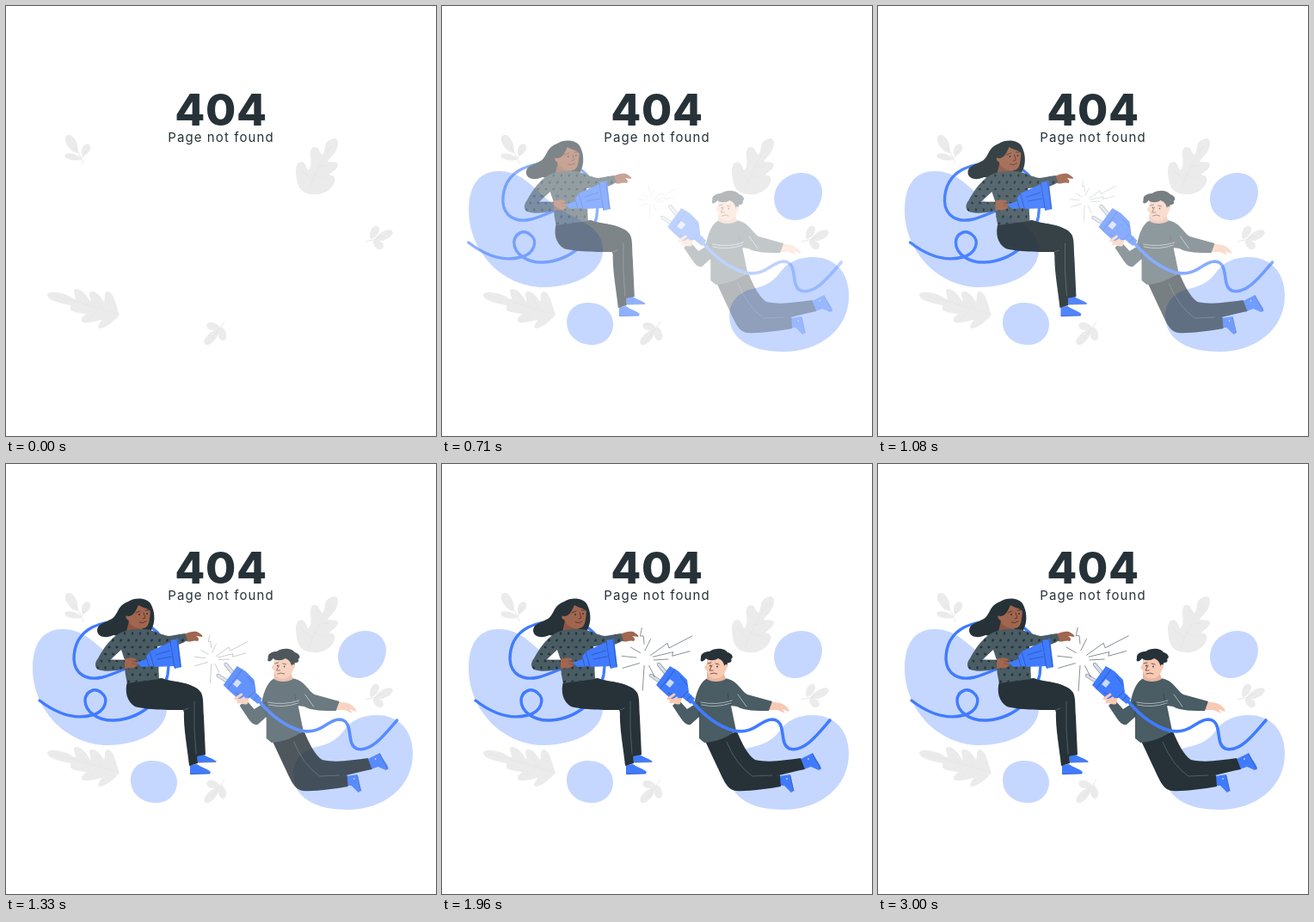
Write an HTML page with a canvas that moves like this. It is 500 by 500 pixels and loops after 3.04 s.

```html
<!DOCTYPE html>
<html lang="en">
<head>
<meta charset="utf-8">
<title>Page not found</title>
<style>
html, body { margin: 0; width: 100%; height: 100%; overflow: hidden; background: #fff; }
canvas { position: absolute; left: 0; top: 0; width: 500px; height: 500px; }
.t { position: absolute; left: 0; width: 500px; text-align: center; color: #263238; white-space: nowrap; font-family: Inter, "Open Sans", sans-serif; }
h1 { margin: 0; top: 90px; font-size: 51px; line-height: 62px; font-weight: 800; letter-spacing: .6px; }
p { margin: 0; top: 143px; font-size: 15px; line-height: 20px; font-weight: 400; letter-spacing: 1.1px; }
</style>
</head>
<body>
<canvas id="stage"></canvas>
<h1 class="t">404</h1>
<p class="t">Page not found</p>
<script>
const LOOP = 3040, FPS = 24, SIZE = 500;
const BLUE = '#407bff', PALE = '#c5d7ff', NAVY = '#2a52a8', INK = '#263238', KNIT = '#4a5c64';
const LEAF = '#ebebeb', VEIN = '#f7f7f7', BROWN = '#a0664f', PEACH = '#f8c9b3';
const dpr = window.devicePixelRatio || 1;
const stage = document.getElementById('stage');
const layer = document.createElement('canvas');
stage.width = stage.height = layer.width = layer.height = SIZE * dpr;
const out = stage.getContext('2d'), buf = layer.getContext('2d');
let g = out;

function fill(d, color) {
  g.fillStyle = color;
  g.fill(new Path2D(d));
}
function line(d, color, w = 1) {
  g.strokeStyle = color;
  g.lineWidth = w;
  g.lineCap = g.lineJoin = 'round';
  g.stroke(new Path2D(d));
}
function oval(x, y, rx, ry, deg, color) {
  g.fillStyle = color;
  g.beginPath();
  g.ellipse(x, y, rx, ry, deg * Math.PI / 180, 0, 7);
  g.fill();
}
// pointed leaf from base (x, y) towards deg
function blade(x, y, len, w, deg) {
  g.save();
  g.translate(x, y);
  g.rotate(deg * Math.PI / 180);
  fill(`M0 0C${len * .25} ${-w} ${len} ${-w} ${len} 0C${len} ${w} ${len * .25} ${w} 0 0Z`, LEAF);
  g.restore();
}

function leaves() {
  blade(83, 171, 24, 7.5, -120);
  blade(89, 174, 15, 6, -62);
  blade(88, 178, 20, 5, -167);
  line('M80 164Q86 172 90 183M88 177L93 168', '#dedede', .7);

  fill('M381 154C386 153 387 159 385 165C383 172 376 177 374 181C378 182 386 180 386 185C385 191 377 193 376 197C380 196 384 199 382 205C378 215 367 220 358 219C347 219 341 214 339 206C337 197 335 185 341 182C347 179 349 187 351 191C355 189 355 182 354 176C353 169 355 163 360 164C365 165 364 171 368 173C371 170 370 165 372 160C374 156 378 155 381 154Z', LEAF);
  line('M378 163Q363 184 352 214M362 187L375 185M358 196L371 201M356 202L344 192', '#e5e5e5', .6);

  blade(428, 273, 24, 6.5, -27);
  blade(424, 271, 17, 6, -62);
  blade(427, 273, 14, 6, 38);
  line('M418 274Q428 273 438 267', '#dedede', .7);

  fill('M48 335C51 331 61 333 68 335C74 337 78 341 81 341C82 338 76 330 81 329C88 328 95 338 98 344C100 342 94 334 99 332C106 331 111 340 114 344C116 341 113 333 118 332C126 333 128 349 132 359C126 366 118 373 110 375C105 375 107 370 112 365C105 366 97 369 91 368C85 367 88 361 94 358C87 357 80 357 76 354C73 351 77 349 75 348C66 346 47 343 48 335Z', LEAF);
  line('M55 337Q90 346 129 358M95 347L87 336M112 352L105 339M108 353L98 363', '#e5e5e5', .6);

  blade(248, 376, 24, 6.5, 134);
  blade(249, 375, 16, 6, -165);
  blade(250, 373, 16, 6, 80);
  line('M254 367Q248 376 239 387', '#dedede', .7);
}

function blobs() {
  fill('M31 238C31 211 41 192 66 192C92 192 106 211 128 230C151 248 187 253 187 284C187 311 153 327 118 327C70 327 31 285 31 238Z', PALE);
  fill('M145 366C146 352 157 345 170 345C187 345 199 356 199 371C198 386 187 394 174 394C157 394 144 382 145 366Z', PALE);
  fill('M386 223C387 206 401 195 417 194C433 194 442 204 442 217C441 235 428 248 411 249C396 249 386 239 386 223Z', PALE);
  fill('M334 360C334 345 344 334 357 330C374 326 384 322 392 311C401 298 414 292 431 292C458 292 473 311 473 337C473 375 440 402 397 402C360 402 334 388 334 360Z', PALE);
}

const knit = 'M136 195C147 191 161 192 168 193C177 196 184 200 190 200L208 197L211 205C203 210 195 212 188 211L176 212L178 250L141 255C139 248 139 243 138 238C127 241 115 242 107 239C103 236 103 231 107 226C114 213 124 199 136 195ZM134 216L121 228L138 228Z';

function woman() {
  line('M39 275C56 288 78 298 100 292C116 288 120 273 111 266C103 259 92 265 92 275C92 288 107 299 126 298C158 296 182 274 188 245C192 219 183 196 165 188C145 180 118 181 100 190C83 199 79 214 79 227C80 245 94 252 112 248C128 244 140 236 158 231', BLUE, 3.4);

  fill('M142 160C151 154 166 156 169 164C174 174 174 188 166 197C158 204 151 195 146 198C137 204 131 200 125 199C119 202 107 203 106 194C106 185 115 185 121 181C131 177 128 165 142 160Z', INK);

  // far leg and shoes
  fill('M222 338L230 338C234 341 240 342 245 346L223 347Z', BLUE);
  fill('M214 350L222 349C227 353 234 354 238 358L237 360L214 361Z', BLUE);
  line('M224 347L244 346.5M215 360.5L237 360', NAVY, .7);
  fill('M188 252C205 254 222 257 227 266C230 272 229 282 230 294L232 338L221 340L205 282Z', INK);
  fill('M141 253L181 249C194 254 216 253 221 263C224 270 220 280 219 292L223 348L213 351C211 330 206 307 207 286C190 286 163 286 150 282C140 276 138 264 141 253Z', INK);
  line('M207 286L212 284M219 276Q218 307 221 337', '#617078', .7);

  fill('M207 198C212 196 217 194 222 195C226 197 230 200 228 201L221 200C224 202 225 204 223 206C218 204 214 208 210 206Z', BROWN);
  fill('M144 178L160 188L158 194C153 200 144 199 140 195Z', '#8d5643');

  fill(knit, KNIT);
  g.save();
  g.clip(new Path2D(knit));
  for (let row = 0; row < 8; row++)
    for (let col = 0; col < 13; col++)
      oval(102 + col * 9 + row % 2 * 4.5, 197 + row * 8, 1.25, 1.7, row * 35, INK);
  g.restore();
  line('M138 238Q144 231 141 218M137 228L121 228', '#344349', .7);

  fill('M144 168C146 163 157 160 164 163C169 166 168 174 167 180C166 187 164 191 159 191C150 192 144 187 142 181C139 181 138 175 142 174Z', BROWN);
  fill('M142 177C148 177 151 171 154 164C158 167 164 167 168 171C169 164 164 157 154 157C144 157 139 166 138 176Z', INK);
  line('M151 173L156 171M162 170L166 170M160 173L162 179L159 180M155 184Q159 186 163 183', '#512f27', .8);
  oval(155, 175, .9, 1.1, 0, INK);
  oval(164, 174, .9, 1.1, 0, INK);

  // socket
  fill('M151 231L163 227L163 223L168 220L172 235L158 236Z', BLUE);
  fill('M164 223L167 218L191 207L197 235L172 236L167 233Z', BLUE);
  fill('M191 205L200 203L204 236L196 238Z', BLUE);
  line('M191 206L196 237M199 204L203 236M167 218L172 236M163 224L166 235M174 222L190 217M176 227L192 224', NAVY, .75);

  fill('M138 227C143 225 151 225 152 228L148 229C153 230 154 232 152 235C149 238 143 237 138 238Z', BROWN);
  line('M147 229L152 230M147 232L152 233', '#79473a', .6);
}

function man() {
  // shoes and legs
  fill('M392 363L405 361L409 380L406 382L398 374L393 374Z', BLUE);
  fill('M417 343L431 336C434 343 440 349 441 354L438 356L429 352L421 355Z', BLUE);
  line('M405 363L409 380M431 337L440 355', NAVY, .7);
  oval(426, 343, .8, .8, 0, '#fff');
  oval(401, 366, .8, .8, 0, '#fff');
  fill('M318 320L343 311C349 325 355 338 364 344C381 348 400 344 417 342L422 355C402 359 383 365 366 366C352 365 333 350 318 320Z', INK);
  fill('M306 322L331 316C337 333 347 352 360 363L393 362L394 375C377 378 354 381 342 380C331 379 327 366 320 352Z', INK);
  line('M331 323Q342 350 361 363L384 362', '#627077', .7);

  // far hand and sleeves
  fill('M381 277C388 277 395 277 399 281C402 283 405 287 403 288L396 285L399 290L390 286L380 286Z', PEACH);
  fill('M307 250C316 247 325 248 333 250C344 253 348 264 355 268L384 276L380 287C366 287 352 287 343 282L336 281L342 310C332 318 319 323 305 324L299 319L299 294L289 303C284 304 281 300 278 296L268 281L275 274L285 285L293 280C295 270 298 256 307 250Z', KNIT);
  line('M293 280L299 277L299 294M336 281Q332 274 332 267', '#344349', .8);
  line('M301 277Q319 281 337 275M302 280Q319 284 336 278M344 268L354 282', '#dce2e4', .65);

  // head
  fill('M308 242L325 236L330 250C324 254 313 254 308 250Z', '#e9b59f');
  fill('M308 225C315 221 327 222 330 229C333 235 330 244 324 248C316 252 309 248 308 240L305 237L308 232Z', PEACH);
  fill('M301 226C300 219 308 218 311 218C318 213 329 214 332 219C337 220 340 225 336 227C338 229 335 232 332 231C332 234 331 237 329 237C328 233 327 228 321 226C317 229 310 229 307 226C304 231 299 230 301 226Z', INK);
  oval(330, 236, 2, 3, 20, PEACH);
  line('M309 232L313 231M318 232L322 233M314 234L311 240L315 240M312 244Q316 242 320 244', '#593d36', .8);
  oval(312, 234.5, .8, 1, 0, INK);
  oval(320, 235.5, .8, 1, 0, INK);

  fill('M263 269C268 267 275 268 279 272L277 279C272 281 265 277 263 272Z', PEACH);
  line('M252 233L261 244M243 246L254 253', '#87949a', 4.4);
  line('M252 233L261 244M243 246L254 253', '#d7dfec', 3);
  fill('M265 235L275 241L285 251L287 265L279 272L266 273L255 263L249 257Z', BLUE);
  fill('M284 263L294 273L289 279L279 271Z', BLUE);
  line('M271 239L254 261M286 264L278 272M290 269L284 275M277 247L285 257M263 266L271 270', NAVY, .75);
  fill('M265 250L270 254L265 260L260 256Z', '#cbdaff');
  line('M263 273L270 268M266 277L273 272', PEACH, 3);
  line('M290 275C300 287 317 304 339 310C363 315 370 297 384 297C402 298 391 326 404 331C421 336 438 313 451 298', BLUE, 3.6);
}

function sparks() {
  line('M231 188L229 198L233 198L234 208M242 202L235 216M242 222L263 207L265 213L294 198M245 224L270 218L269 223L291 217M246 228L264 227M234 235L232 266M228 232L207 238M217 212L229 219M206 223L224 225M240 235L247 249', INK, .65);
}

const ease = (t, span) => (1 - Math.cos(Math.PI * t / span)) / 2;
const rise = (t, span) => ease(Math.min(t, span), span);

function clear(c) {
  c.setTransform(dpr, 0, 0, dpr, 0, 0);
  c.clearRect(0, 0, SIZE, SIZE);
}

// draws a group on its own layer so that overlaps fade as one
function group(draw, alpha, dx = 0, scale = 1) {
  clear(buf);
  buf.translate(250 + dx, 227);
  buf.scale(scale, scale);
  buf.translate(-250, -227);
  g = buf;
  draw();
  g = out;
  out.globalAlpha = alpha;
  out.drawImage(layer, 0, 0, SIZE, SIZE);
  out.globalAlpha = 1;
}

function slide(draw, p, from) {
  group(draw, p, from * (1 - p));
}

function render(ms) {
  const t = Math.floor(ms * FPS / 1000) * 1000 / FPS;
  clear(out);
  g = out;
  leaves();
  if (ms < 170) return;
  slide(blobs, rise(t, 750), 20);
  slide(woman, rise(t, 1270), -20);
  slide(man, rise(t, 1800), 20);
  const pulse = ease(t, 2500);
  group(sparks, pulse, 0, .37 + .63 * pulse);
}

const start = performance.now();
function tick() {
  render((performance.now() - start) % LOOP);
  requestAnimationFrame(tick);
}
tick();
</script>
</body>
</html>
```
